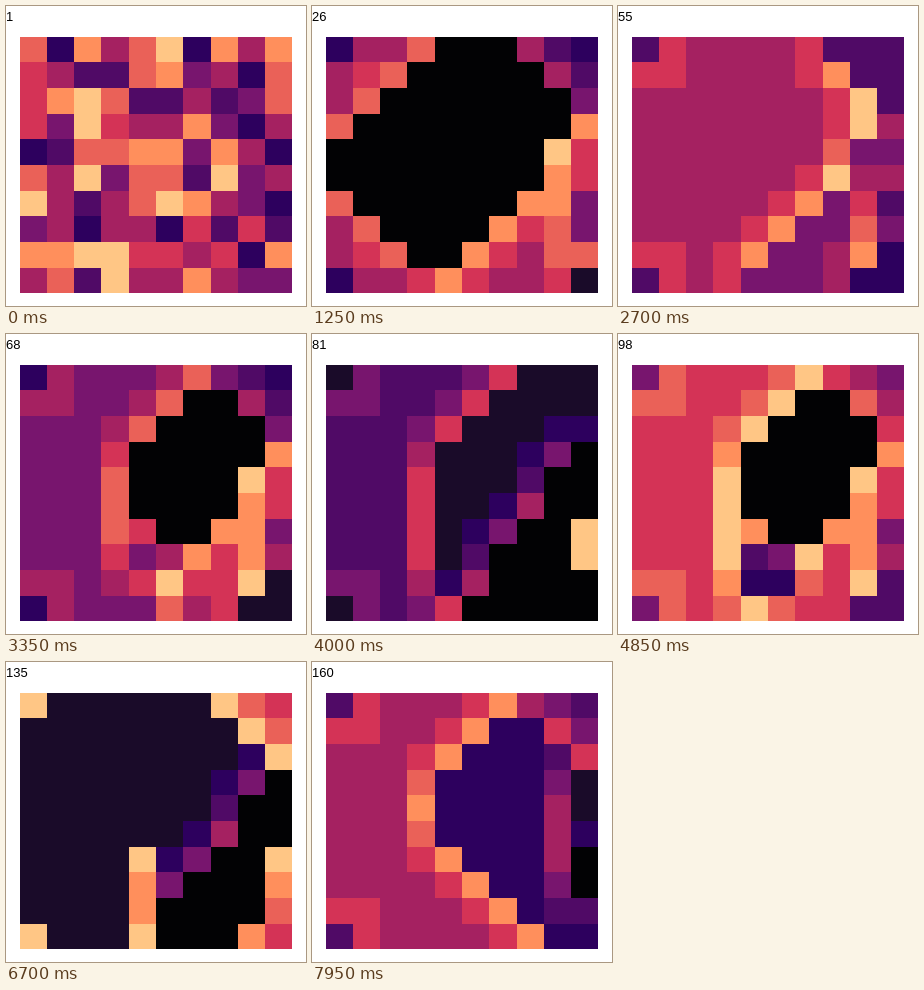
An HTML page that plays this animation: 300 px wide and 300 px high, repeating every 8000 ms.

```html
<!DOCTYPE html>
<html lang="en">
<head>
<meta charset="utf-8">
<title>Energy grid</title>
<style>
  html, body { margin: 0; width: 100%; height: 100%; overflow: hidden; background: #fff; }
  svg { display: block; width: 100vw; height: 100vh; }
  text { font: 13px "Liberation Sans", Arial, sans-serif; }
</style>
</head>
<body>
<svg viewBox="0 0 300 300">
  <text id="count" x="0" y="15">1</text>
  <g id="grid" shape-rendering="crispEdges"></g>
</svg>
<script>
const SIZE = 10, STEP_MS = 50, STEPS = 160;
const COLORS = ['#020204', '#1a0b29', '#2d005e', '#500a66', '#78156e',
                '#a52161', '#d43356', '#ea6158', '#ff8f5c', '#ffc685'];
const START = ['7285792858', '6533784527', '6897335347', '6496558425', '2377884852',
               '7594773945', '9535798542', '4525526363', '8899665628', '5739558544'];

// One step: every cell gains 1; a cell above 9 flashes, feeds its neighbours and drops to 0.
function advance(cells) {
  const next = cells.map(v => v + 1);
  const flashed = new Set();
  const queue = next.flatMap((v, i) => v > 9 ? [i] : []);
  while (queue.length) {
    const i = queue.pop();
    if (flashed.has(i)) continue;
    flashed.add(i);
    const x = i % SIZE, y = Math.floor(i / SIZE);
    for (let ny = Math.max(0, y - 1); ny <= Math.min(SIZE - 1, y + 1); ny++)
      for (let nx = Math.max(0, x - 1); nx <= Math.min(SIZE - 1, x + 1); nx++) {
        const n = ny * SIZE + nx;
        if (++next[n] > 9 && !flashed.has(n)) queue.push(n);
      }
  }
  return next.map((v, i) => flashed.has(i) ? 0 : v);
}

const states = [[...START.join('')].map(Number)];
while (states.length < STEPS) states.push(advance(states.at(-1)));

const edgeX = i => Math.round(13.6 + 27.28 * i);
const edgeY = i => Math.round(30.6 + 25.68 * i);
const grid = document.getElementById('grid');
const count = document.getElementById('count');
const rects = states[0].map((_, i) => {
  const x = i % SIZE, y = Math.floor(i / SIZE);
  const rect = document.createElementNS(grid.namespaceURI, 'rect');
  const box = { x: edgeX(x), y: edgeY(y), width: edgeX(x + 1) - edgeX(x), height: edgeY(y + 1) - edgeY(y) };
  for (const key in box) rect.setAttribute(key, box[key]);
  return grid.appendChild(rect);
});

let shown = -1;
function show(step) {
  if (step === shown) return;
  shown = step;
  count.textContent = step + 1;
  rects.forEach((rect, i) => rect.setAttribute('fill', COLORS[states[step][i]]));
}

const begin = performance.now();
function tick() {
  show(Math.floor((performance.now() - begin) / STEP_MS) % STEPS);
  requestAnimationFrame(tick);
}
tick();
</script>
</body>
</html>
```
